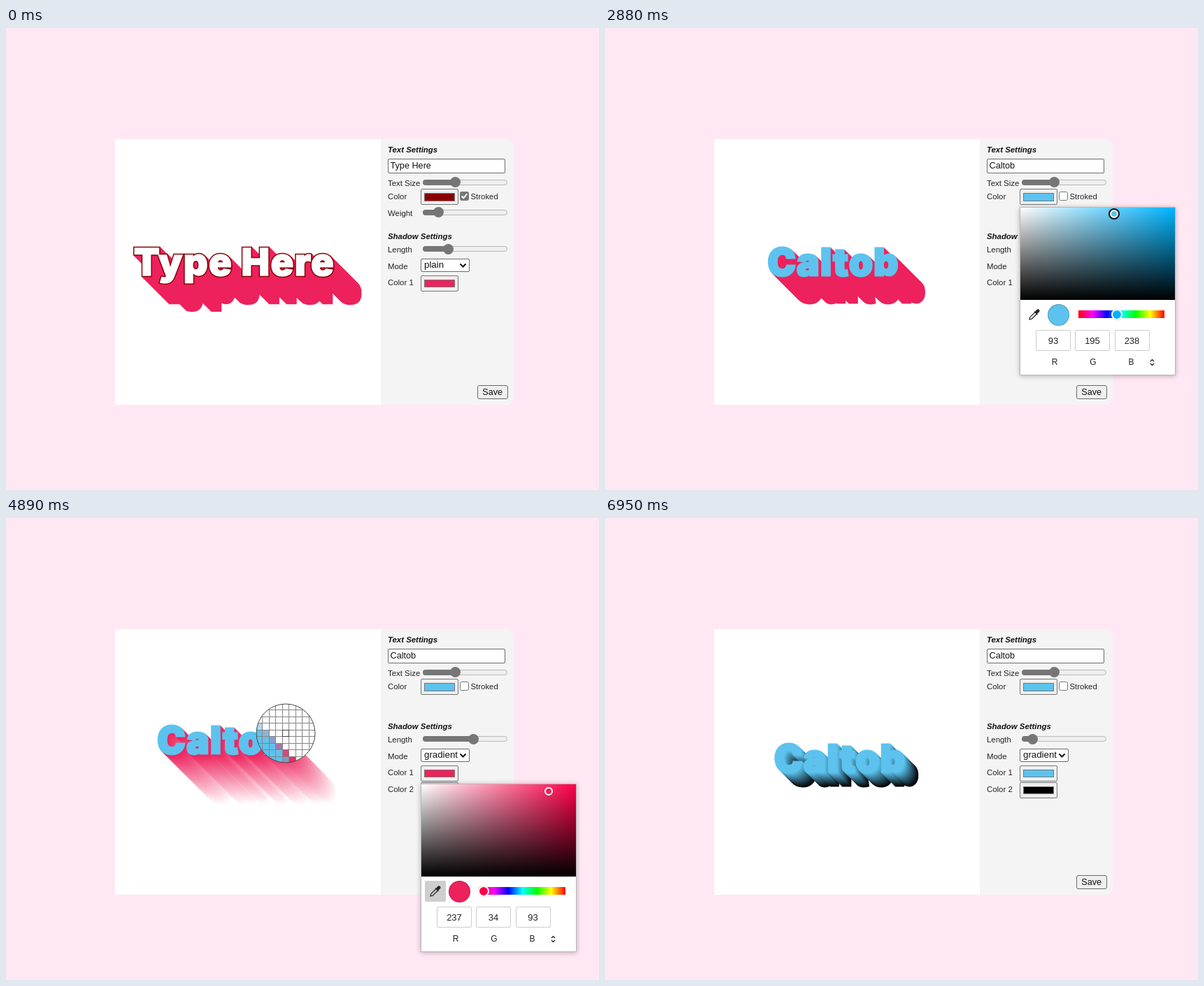
An HTML page with a canvas that plays this animation: 848 by 661 pixels, repeating every 7130 ms.

```html
<!DOCTYPE html>
<html lang="en">
<head>
<meta charset="utf-8">
<title>Text shadow editor</title>
<style>
  html, body { margin: 0; width: 100%; height: 100%; overflow: hidden; background: #ffe8f4; }
  #stage { position: absolute; inset: 0; overflow: hidden; color: #222; font: 11.4px/14px Arial, "Liberation Sans", sans-serif; white-space: pre; }
  #stage * { position: absolute; box-sizing: border-box; }
  #art { left: 156px; top: 159px; }
  #panel { left: 536px; top: 159px; width: 190px; height: 380px; background: #f4f4f4; border-radius: 0 10px 10px 0; }
  #weightRow, #farRow { left: 0; top: 0; }
  .label { left: 546px; }
  b.label { font-style: italic; color: #111; }
  .field, .select, .save { border: 1px solid #6b6b6b; border-radius: 2px; font-size: 12.67px; color: #111; }
  .field { left: 545.5px; top: 187px; width: 168.5px; height: 21px; padding-left: 3px; background: #fff; line-height: 19px; }
  .field.focus { border: 2px solid #101010; border-radius: 3px; padding-left: 2px; line-height: 17px; }
  #stage .field span { position: static; }
  #mark { background: #3297fd; color: #fff; }
  .wavy { text-decoration: underline wavy #e33 1px; text-decoration-skip-ink: none; text-underline-offset: 0; }
  .select { left: 593px; top: 330px; width: 70px; height: 18.5px; padding-left: 4px; background: #fff; font-size: 13.3px; line-height: 16.5px; }
  .select svg { left: 54px; top: 5px; }
  .save { left: 673.5px; top: 511px; width: 44.5px; height: 20px; background: #efefef; text-align: center; line-height: 18px; border-radius: 3px; }
  .range { left: 596px; width: 121px; height: 8px; --c: #767676; }
  .range::before { content: ""; position: absolute; inset: 0; border: 1px solid #b9b9b9; border-radius: 4px; background: #efefef; }
  .range i { left: 0; top: 0; height: 8px; width: var(--x); border-radius: 4px 0 0 4px; background: var(--c); }
  .range i::after { content: ""; position: absolute; right: -7.5px; top: -3.5px; width: 15px; height: 15px; border-radius: 50%; background: var(--c); }
  .swatch { left: 593px; width: 53.5px; height: 23px; border: 1px solid #767676; border-radius: 2px; background: #efefef; }
  .swatch i { left: 4px; top: 5px; width: 44px; height: 11.5px; border: 1px solid #777; }
  #check { left: 649px; top: 234px; width: 12.5px; height: 12.5px; border: 1px solid #767676; border-radius: 2.5px; background: #fff; }
  #check.on { background: #767676; }
  #check svg { left: -1px; top: -1px; }
  #check:not(.on) svg { display: none; }
  #picker { left: 594px; width: 221px; height: 239px; background: #fff; box-shadow: 0 0 0 1px #b8b8b8, 0 1px 7px 1px rgba(0,0,0,.28); color: #222; }
  #area { left: 0; top: 0; width: 221px; height: 132px; overflow: hidden; background: linear-gradient(to top, #000, transparent), linear-gradient(to right, #fff, transparent), var(--hue); }
  #ring { width: 12px; height: 12px; margin: -6px; border: 2px solid #fff; border-radius: 50%; }
  #ring.focus { box-shadow: 0 0 0 2px #101010; }
  #dropper { left: 5px; top: 138px; width: 30px; height: 30px; border-radius: 2px; }
  #dropper svg { left: 7px; top: 7px; }
  #dot { left: 39px; top: 138px; width: 31px; height: 31px; border-radius: 50%; border: 1px solid rgba(0,0,0,.2); }
  #hues { left: 83px; top: 147px; width: 123px; height: 11px; background: linear-gradient(to right, red, magenta, blue, cyan, lime, yellow, red); }
  #knob { top: 5.5px; width: 16px; height: 16px; margin: -8px; border: 2px solid #fff; border-radius: 50%; background: var(--hue); box-shadow: 0 0 1px rgba(0,0,0,.4); }
  .num { top: 175px; width: 50px; height: 30px; border: 1px solid #ccc; border-radius: 2px; text-align: center; line-height: 29px; font-size: 13px; }
  .chan { top: 214px; width: 20px; text-align: center; font-size: 12px; }
  #arrows { left: 185px; top: 216px; }
  #loupe { margin: -43px; }
</style>
</head>
<body>
<div id="stage">
  <canvas id="art" width="380" height="380"></canvas>
  <div id="panel"></div>

  <b class="label" style="top:167px">Text Settings</b>
  <div class="field" id="field"><span id="head"></span><span id="mark"></span></div>
  <span class="label" style="top:214.5px">Text Size</span>
  <div class="range" id="size" style="top:216.5px;--x:46.5px"><i></i></div>
  <span class="label" style="top:233.5px">Color</span>
  <div class="swatch" style="top:230px"><i id="fillSwatch"></i></div>
  <div id="check"><svg width="13" height="13" fill="none" stroke="#fff" stroke-width="2"><path d="M2.5 6.5l2.8 2.8 5-6"/></svg></div>
  <span class="label" style="left:664.5px;top:233.5px">Stroked</span>
  <div id="weightRow">
    <span class="label" style="top:257.5px">Weight</span>
    <div class="range" id="weight" style="top:259.5px;--x:22px"><i></i></div>
  </div>

  <b class="label" style="top:290.5px">Shadow Settings</b>
  <span class="label" style="top:309.5px">Length</span>
  <div class="range" id="length" style="top:312px"><i></i></div>
  <span class="label" style="top:333.5px">Mode</span>
  <div class="select"><span id="mode"></span><svg width="11" height="8" fill="none" stroke="#111" stroke-width="2"><path d="M1.5 1.5l4 4 4-4"/></svg></div>
  <span class="label" style="top:357px">Color 1</span>
  <div class="swatch" style="top:353.5px"><i id="nearSwatch"></i></div>
  <div id="farRow">
    <span class="label" style="top:381px">Color 2</span>
    <div class="swatch" style="top:377.5px"><i id="farSwatch"></i></div>
  </div>
  <div class="save">Save</div>

  <div id="picker">
    <div id="area"><div id="ring"></div></div>
    <div id="dropper"><svg width="16" height="16" fill="none" stroke="#222" stroke-width="1.2"><path d="M9 4.5L1.8 11.7 1 15l3.3-.8L11.5 7"/><path d="M8 3.5l4.5 4.5M9.3 4.7l2.4-3.2q1.4-1.2 2.6 0t0 2.6l-3 2.6z" fill="#222"/></svg></div>
    <div id="dot"></div>
    <div id="hues"><div id="knob"></div></div>
    <div class="num" style="left:22px"></div>
    <div class="num" style="left:78px"></div>
    <div class="num" style="left:134.5px"></div>
    <span class="chan" style="left:39px">R</span>
    <span class="chan" style="left:94px">G</span>
    <span class="chan" style="left:148.5px">B</span>
    <svg id="arrows" width="7" height="11" fill="none" stroke="#222" stroke-width="1.3"><path d="M1 4l2.5-2.5L6 4M1 7l2.5 2.5L6 7"/></svg>
  </div>
  <canvas id="loupe" width="86" height="86"></canvas>
</div>

<script>
const LOOP = 7130, WORD = 'Caltob', FIRST = 'Type Here';
const RED = [139, 0, 0], PINK = [237, 34, 93], BLUE = [93, 195, 238];
const BLUE_PICK = { hue: 197.7, x: 134, y: 9 };

const $ = id => document.getElementById(id);
const art = $('art').getContext('2d');
const lens = $('loupe').getContext('2d');
const nums = document.querySelectorAll('.num');

const css = c => `rgb(${c.map(Math.round)})`;
const mix = (a, b, k) => a + (b - a) * k;
const mixColor = (a, b, k) => a.map((v, i) => mix(v, b[i], k));
const show = (id, on) => $(id).style.display = on ? '' : 'none';

// Eased progress of t through the span a..b
function ease(t, a, b) {
  const k = Math.min(1, Math.max(0, (t - a) / (b - a)));
  return k * k * (3 - 2 * k);
}

function pickToRgb({ hue, x, y }) {
  const s = x / 220, v = 1 - y / 132;
  return [5, 3, 1].map(n => {
    const k = (n + hue / 60) % 6;
    return Math.round(255 * v * (1 - s * Math.max(0, Math.min(k, 4 - k, 1))));
  });
}

function fillPick(t) {
  if (t >= 2870) return BLUE_PICK;
  const k = ease(t, 2540, 2870);
  return { hue: mix(360, BLUE_PICK.hue, ease(t, 2190, 2480)), x: mix(220, 134, k), y: mix(60, 9, k) };
}

function stateAt(t) {
  const s = { stroked: t < 1750, gradient: t >= 3900, picker: null, loupe: null };

  const typed = Math.min(WORD.length, 1 + Math.floor((t - 500) / 74));
  s.text = t < 500 ? FIRST : WORD.slice(0, typed);
  s.focus = t >= 160 && t < 1450;
  s.marked = t < 500 ? Math.round(FIRST.length * ease(t, 180, 270)) : 0;
  s.wavy = t >= 1040 && t < 1450;

  s.thumb = 632 + 36 * ease(t, 3180, 3700) - 57 * ease(t, 6440, 6950);
  s.len = 39 + (s.thumb - 632) * .9;
  s.dragging = (t > 3180 && t < 3700) || (t > 6440 && t < 6950);

  const pick = fillPick(t);
  s.fill = t < 2190 ? RED : t < 2870 ? pickToRgb(pick) : BLUE;
  s.near = t < 5180 ? PINK : BLUE;
  const dark = 132 * ease(t, 5860, 6120);
  s.far = pickToRgb({ hue: 0, x: 0, y: dark });

  if (t >= 1900 && t < 2990) {
    s.picker = { top: 257, ...pick, rgb: s.fill, focus: t > 2520 };
  } else if (t >= 4250 && t < 5490) {
    const at = t < 5180 ? { hue: 343, x: 182, y: 10 } : BLUE_PICK;
    s.picker = { top: 381, ...at, rgb: s.near, active: t >= 4560 && t < 5180 };
  } else if (t >= 5770 && t < 6320) {
    s.picker = { top: 405, hue: 360, x: 0, y: dark, rgb: s.far };
  }
  if (t >= 4600 && t < 5180) {
    const out = ease(t, 4620, 4890), back = ease(t, 4920, 5120);
    s.loupe = [614 - 214 * out - 22 * back, 534 - 226 * out + 14 * back];
  }
  return s;
}

function drawArt(s) {
  const { text, len, stroked } = s;
  const put = (color, d) => {
    const x = 190 - len / 2 + d, y = 214 - len / 2 + d;
    const layer = (paint, width) => {
      art.fillStyle = art.strokeStyle = paint;
      art.lineWidth = width;
      art.strokeText(text, x, y);
      art.fillText(text, x, y);
    };
    layer(css(color), stroked ? 4.5 : 3);
    if (stroked && !d) layer('#fff', 1.5);
  };
  art.fillStyle = '#fff';
  art.fillRect(0, 0, 380, 380);
  art.font = '900 54px Inter, "Noto Sans", sans-serif';
  art.letterSpacing = '1.5px';
  art.textAlign = 'center';
  art.miterLimit = 3;
  for (let i = Math.round(len); i > 0; i--) {
    put(s.gradient ? mixColor(s.near, s.far, Math.min(1, i / len)) : s.near, i);
  }
  put(s.fill, 0);
}

function drawLoupe([x, y]) {
  const cell = 9.5, from = 43 - 4.5 * cell;
  $('loupe').style.left = x + 'px';
  $('loupe').style.top = y + 'px';
  lens.clearRect(0, 0, 86, 86);
  lens.save();
  lens.beginPath();
  lens.arc(43, 43, 42, 0, 7);
  lens.clip();
  lens.fillStyle = '#f4f4f4';
  lens.fillRect(0, 0, 86, 86);
  lens.imageSmoothingEnabled = false;
  lens.drawImage($('art'), Math.round(x) - 160, Math.round(y) - 163, 9, 9, from, from, 9 * cell, 9 * cell);
  lens.beginPath();
  for (let i = 0; i < 10; i++) {
    const p = Math.floor(from + i * cell) + .5;
    lens.moveTo(p, 0); lens.lineTo(p, 86);
    lens.moveTo(0, p); lens.lineTo(86, p);
  }
  lens.lineWidth = 1;
  lens.strokeStyle = '#858585';
  lens.stroke();
  lens.restore();
  lens.strokeStyle = '#444';
  lens.strokeRect(38.5, 38.5, 9, 9);
  lens.beginPath();
  lens.arc(43, 43, 42, 0, 7);
  lens.stroke();
}

function drawPicker(p) {
  const el = $('picker');
  el.style.top = p.top + 'px';
  el.style.setProperty('--hue', `hsl(${p.hue}, 100%, 50%)`);
  $('ring').style.left = p.x + 'px';
  $('ring').style.top = p.y + 'px';
  $('ring').classList.toggle('focus', !!p.focus);
  $('ring').style.background = css(p.rgb);
  $('dropper').style.background = p.active ? '#cecece' : '';
  $('dot').style.background = css(p.rgb);
  $('knob').style.left = (360 - p.hue) / 360 * 123 + 'px';
  nums.forEach((n, i) => n.textContent = p.rgb[i]);
}

function drawPanel(s, t) {
  const cut = s.text.length - s.marked;
  $('head').textContent = s.text.slice(0, cut);
  $('mark').textContent = s.text.slice(cut);
  $('head').className = s.wavy ? 'wavy' : '';
  $('field').classList.toggle('focus', s.focus);
  $('check').classList.toggle('on', s.stroked);
  show('weightRow', s.stroked);
  show('farRow', s.gradient);
  $('mode').textContent = s.gradient ? 'gradient' : 'plain';
  $('fillSwatch').style.background = css(s.fill);
  $('nearSwatch').style.background = css(s.near);
  $('farSwatch').style.background = css(s.far);

  const hover = (a, b) => t >= a && t < b ? '#616161' : '#767676';
  $('length').style.setProperty('--x', s.thumb - 596 + 'px');
  $('length').style.setProperty('--c', s.dragging ? '#858585' : hover(60, 90));
  $('weight').style.setProperty('--c', hover(100, 130));
  $('size').style.setProperty('--c', hover(135, 155));
}

function frame(now) {
  const t = now % LOOP, s = stateAt(t);
  drawArt(s);
  drawPanel(s, t);
  show('picker', s.picker);
  if (s.picker) drawPicker(s.picker);
  show('loupe', s.loupe);
  if (s.loupe) drawLoupe(s.loupe);
}

const start = performance.now();
function tick() {
  frame(performance.now() - start);
  requestAnimationFrame(tick);
}
tick();
</script>
</body>
</html>
```
